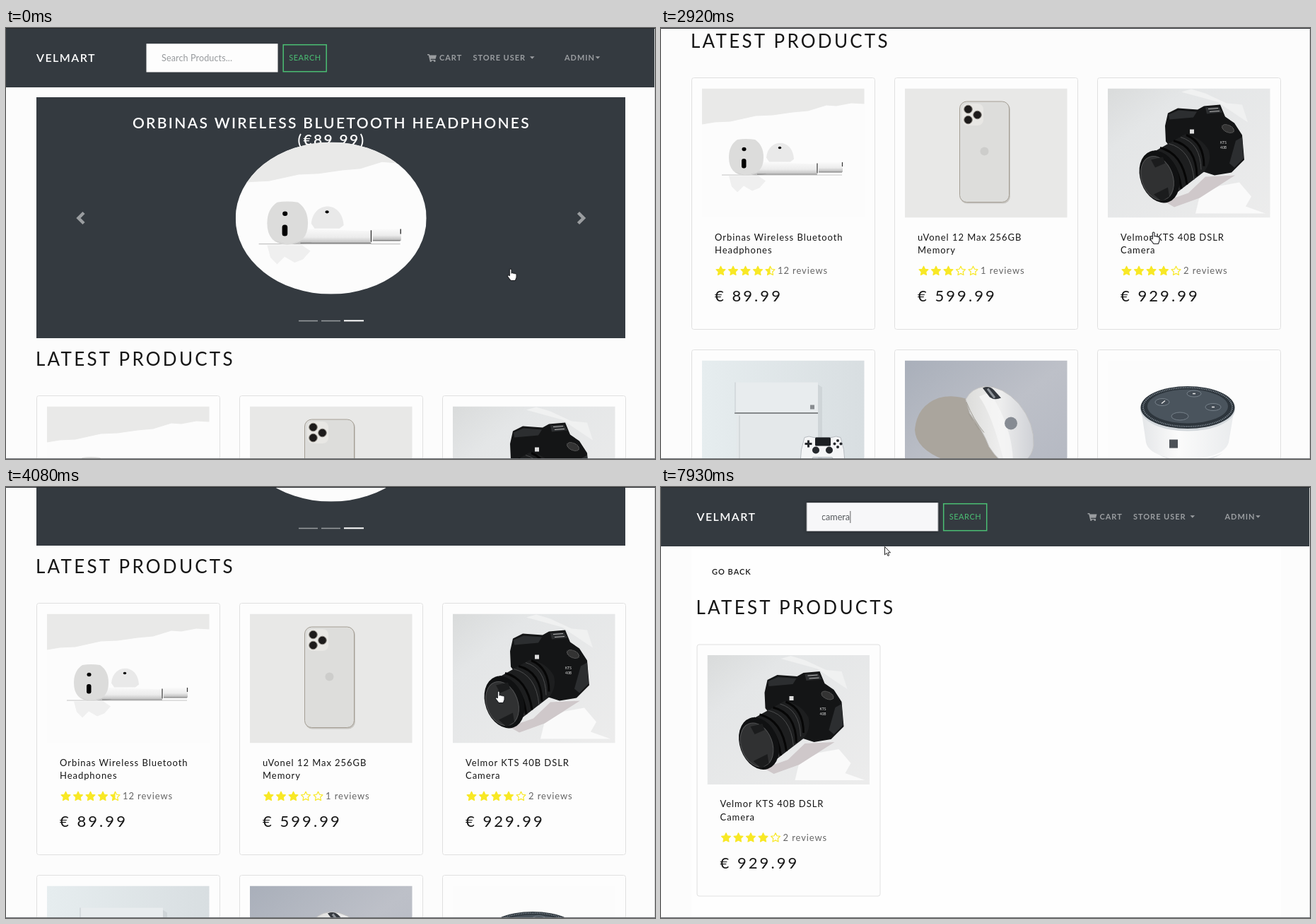
An HTML page that plays this animation: 918x610 px, repeating every 8 s.

```html
<!DOCTYPE html>
<html lang="en">
<head>
<meta charset="utf-8">
<title>Shop search</title>
<style>
html, body { margin: 0; width: 100%; height: 100%; overflow: hidden; background: #fcfcfc; }
#stage { position: relative; width: 918px; height: 610px; overflow: hidden; font-family: Lato, "Open Sans", sans-serif; }
#stage > svg { position: absolute; left: 0; top: 0; display: block; }
text { fill: #161616; white-space: pre; }

/* Everything runs on one 8 s clock with held values */
#scroll, #bar, #home, #results, #field, #hint, #typed, #hand, #beam, #arrow, #wait, #found {
  animation: 8s step-end infinite;
}
#scroll { animation-name: scroll; }
#bar { animation-name: shift; }
#home { animation-name: leave; }
#results { animation-name: enter; opacity: 0; }
#field { animation-name: focus; fill: #fdfdfd; }
#hint { animation-name: hint; fill: #979a9d; }
#hand { animation-name: hand; transform: translate(708px, 340px); }
#beam { animation-name: beam; opacity: 0; }
#arrow { animation-name: enter; opacity: 0; }
#wait { animation-name: wait; }
#found { animation-name: found; opacity: 0; }
#ring { transform-origin: 467px 260.5px; animation: spin .75s steps(6) infinite; }
#typed {
  animation-name: type; position: absolute; left: 219.5px; top: 33.5px; width: 0; height: 17px;
  overflow: hidden; white-space: pre; font-size: 12.6px; line-height: 17px; color: #55595c;
  border-right: 1px solid transparent;
}

@keyframes scroll {
  21.875% { transform: translateY(-23px); }
  23.375% { transform: translateY(-118px); }
  25.125% { transform: translateY(-150px); }
  30.125% { transform: translateY(-252px); }
  31.625% { transform: translateY(-300px); }
  34.75% { transform: translateY(-352px); }
  36.5% { transform: translateY(-450px); }
  38% { transform: translateY(-525px); }
  41.125% { transform: translateY(-625px); }
  42.875% { transform: translateY(-675px); }
  47.625% { transform: translateY(-640px); }
  49.125% { transform: translateY(-525px); }
  51% { transform: translateY(-356px); }
  52.75% { transform: translateY(-200px); }
  54.25% { transform: translateY(-60px); }
  55.75% { transform: none; }
}
@keyframes hand {
  5.75% { transform: translate(707px, 330px); }
  7.25% { transform: translate(703px, 312px); }
  8.75% { transform: translate(700px, 299px); }
  10.625% { transform: translate(693px, 290px); }
  12.5% { transform: translate(691px, 288px); }
  58.875% { transform: translate(430px, 108px); opacity: 1; }
  60.625% { transform: translate(430px, 108px); opacity: 0; }
  100% { opacity: 0; }
}
@keyframes beam {
  60.625% { opacity: 1; transform: translate(4px, 3px); }
  62.125% { opacity: 1; transform: none; }
  71.625% { opacity: 0; }
}
@keyframes type {
  64% { width: 0; border-color: #333; }
  70.125% { width: 6px; border-color: #333; }
  73.5% { width: 12px; border-color: #333; }
  75% { width: 22.5px; border-color: #333; }
  76.5% { width: 29px; border-color: #333; }
  78% { width: 34px; border-color: #333; }
  81.125% { width: 40.5px; border-color: #333; transform: none; }
  88% { width: 40.5px; border-color: transparent; transform: translateX(7.5px); }
  94.375% { width: 40.5px; border-color: #333; transform: translateX(7.5px); }
  100% { width: 40.5px; border-color: #333; transform: translateX(7.5px); }
}
@keyframes shift { 88%, 100% { transform: translateX(7.5px); } }
@keyframes leave { 88%, 100% { opacity: 0; } }
@keyframes enter { 88%, 100% { opacity: 1; } }
@keyframes focus { 64%, 100% { fill: #f7f7f9; filter: drop-shadow(0 0 2px rgba(0, 0, 0, .5)); } }
@keyframes hint { 70.125%, 100% { opacity: 0; } }
@keyframes wait { 97.625%, 100% { opacity: 0; } }
@keyframes found { 97.625%, 100% { opacity: 1; } }
@keyframes spin { to { transform: rotate(360deg); } }

.brand { font-size: 16px; font-weight: 600; letter-spacing: 1.45px; fill: #fff; }
.nav { font-size: 11px; font-weight: 700; letter-spacing: .95px; fill: #9a9da0; }
.find { font-size: 11px; letter-spacing: .5px; fill: #4bbf73; }
.hero { font-size: 21px; font-weight: 600; letter-spacing: 2.35px; fill: #fff; text-anchor: middle; }
.h1 { font-size: 26px; letter-spacing: 3.25px; }
.back { font-size: 11px; font-weight: 600; letter-spacing: 1px; }
.name { font-size: 13px; letter-spacing: .95px; }
.count { font-size: 13px; letter-spacing: .9px; fill: #666; }
.price { font-size: 22px; letter-spacing: 3.05px; }
.tiny { font-size: 5px; fill: #ddd; }
</style>
</head>
<body>
<div id="stage">
<svg width="918" height="610" viewBox="0 0 918 610">
  <defs>
    <linearGradient id="stem" x2="0" y2="1"><stop stop-color="#fafafa"/><stop offset=".55" stop-color="#ececec"/><stop offset="1" stop-color="#b5b5b5"/></linearGradient>
    <linearGradient id="desk" x2="1" y2="1"><stop stop-color="#d9dbdb"/><stop offset=".25" stop-color="#e4e6e7"/><stop offset="1" stop-color="#ececec"/></linearGradient>
    <linearGradient id="wall" x2="1" y2="0"><stop stop-color="#e6edef"/><stop offset="1" stop-color="#d8dee1"/></linearGradient>
    <linearGradient id="mat" x2="1" y2="1"><stop stop-color="#a9afba"/><stop offset=".5" stop-color="#bdc0c8"/><stop offset="1" stop-color="#b3b7c1"/></linearGradient>
    <linearGradient id="shell" x2="1" y2="0"><stop stop-color="#dcdcda"/><stop offset=".5" stop-color="#eeeeee"/><stop offset="1" stop-color="#cfd1d6"/></linearGradient>
    <linearGradient id="cup" x2="1" y2="0"><stop stop-color="#e4e6e8"/><stop offset=".4" stop-color="#fbfbfb"/><stop offset="1" stop-color="#e9ebed"/></linearGradient>
    <clipPath id="oval"><ellipse cx="459.7" cy="269.200" rx="135" ry="107.600"/></clipPath>

    <symbol id="buds" viewBox="0 0 229.5 183">
      <path fill="#fcfcfc" d="M0 0h230v183H0z"/>
      <path fill="#e9e9e8" d="M0 0H230V22L211 21 190 25 176 24 150 32 128 34 100 38 76 39 40 47 18 48 0 51z"/>
      <path fill="#efefef" d="M38 124h42l10 7-9 10-10 4-12-7-9 9-8-8z"/>
      <path stroke="#c4c4c4" d="M28 122.500h170"/>
      <path fill="#e9e9e9" d="M91 98c2-27 37-29 39 2l-5 4h-30z"/>
      <ellipse cx="110" cy="84" rx="2.200" ry="1.800"/>
      <path fill="url(#stem)" d="M76 104l86 3v14H92q-14 3-24 1z"/>
      <path fill="url(#stem)" d="M165 104.500h34v14h-34z"/>
      <path stroke="#333" stroke-width="1.200" d="M163 106v14M198.500 104.500v6"/>
      <path stroke="#777" d="M78 121.500h85M165 118.500h33"/>
      <path fill="#dcdcdb" d="M50 72.500q12-2 25 0 12 8 12 25 0 25-25 26-24-1-24-26 0-17 12-25z"/>
      <path fill="#c6c6c6" d="M46 118q14 8 30 1-12 7-30-1z"/>
      <ellipse cx="59.500" cy="86" rx="3" ry="2.800"/>
      <rect x="56" y="99.500" width="6.500" height="13.500" rx="3"/>
    </symbol>

    <symbol id="phone" viewBox="0 0 229.5 183">
      <path fill="#e8e8e7" d="M0 0h230v183H0z"/>
      <rect x="78" y="20" width="71" height="143" rx="10" fill="#c8c6c2"/>
      <rect x="77.500" y="18.500" width="70" height="142.500" rx="10" fill="#dddddb" stroke="#a49e94"/>
      <rect x="81" y="21.500" width="30" height="31" rx="8" fill="#e8e7e4"/>
      <g fill="#1d1b1b" stroke="#8b8780"><circle cx="89.500" cy="29.500" r="5.800"/><circle cx="102.500" cy="37.500" r="5.800"/><circle cx="89.500" cy="44.500" r="5.800"/></g>
      <circle cx="112.500" cy="89" r="6" fill="#cdcdcb"/>
    </symbol>

    <symbol id="camera" viewBox="0 0 229.5 183">
      <path fill="url(#desk)" d="M0 0h230v183H0z"/>
      <path fill="#f0f1f1" d="M104 5l14-4 20 6 30 14 22 2 8 25-18-12-25-17z"/>
      <path fill="#fafafa" d="M130 152l28-14 28-5 17 20-8 14 28 10H124z"/>
      <path fill="#cfc8ca" d="M80 160l34-12 24-23 42-2-50 32-36 13z"/>
      <path fill="#141516" d="M81 53l4-18 14-7 28 2 9-5 23-2 7 17 13 9 11 17 3 35-18 18-24 4-25-8-30-22-14-18z"/>
      <path fill="#2c2e30" d="M86 37l14-6 26 2-5 8-34 3zM138 27l19-1 5 8-22 2zM181 74l9-5 2 30-13 13-7-6z"/>
      <path stroke="#b8b8b8" d="M142 29l14-1M144 33l14-1"/>
      <ellipse cx="170" cy="57" rx="9" ry="5" fill="#333" stroke="#777" stroke-dasharray="1 1" transform="rotate(25 170 57)"/>
      <path fill="#1d1e1f" d="M54 96l55-31q24 4 34 23 4 17-7 30l-52 40z"/>
      <g fill="none" stroke="#060606" stroke-width="3"><path d="M66 89q32 8 38 53M74 84q32 8 38 52M93 74q32 8 33 50M111 66q25 10 25 44"/></g>
      <g fill="none" stroke="#4b4c4d"><path d="M63 91q32 8 38 53M86 78q32 8 36 51M103 69q28 8 29 46"/></g>
      <ellipse cx="73" cy="125" rx="27" ry="38" fill="#101112" transform="rotate(-20 73 125)"/>
      <ellipse cx="70" cy="127" rx="22" ry="32" fill="#303132" stroke="#505152" transform="rotate(-20 70 127)"/>
      <path fill="#1b1c1d" d="M61 101l17-4 3 9-14 6zM65 150l20-10 2 13-11 7z"/>
      <path fill="#ddd" d="M116 58h6v6h-6z"/>
      <text class="tiny" x="159" y="78">KTS</text><text class="tiny" x="159" y="85">40B</text>
    </symbol>

    <symbol id="console" viewBox="0 0 229.5 183">
      <path fill="url(#wall)" d="M0 0h230v183H0z"/>
      <path fill="#eef2f5" d="M0 148h230v35H0z"/>
      <path fill="#cfd5d8" d="M164 34l6 4v110h-6zM40 148h128v3H40z"/>
      <path fill="#e8ecee" d="M47 31h117v43H47z"/>
      <path fill="#e4e8ea" d="M49 75h115v74H49z"/>
      <path stroke="#66696b" stroke-width="1.300" d="M46 74.500h118"/>
      <path stroke="#c5cbce" d="M53 78v70M47 31v43"/>
      <path fill="#888c90" d="M153 63h6v6h-6z"/>
      <path fill="#f4f5f6" stroke="#b6bbc0" d="M145 109q6-3 13 0h25q7-3 13 0 6 17 6 34-1 11-9 9l-9-15h-27l-8 15q-9 2-10-8 0-18 6-35z"/>
      <rect x="160" y="109" width="22" height="12" rx="1.500" fill="#1c1f23"/>
      <g fill="#26292d"><circle cx="161" cy="127" r="5"/><circle cx="180" cy="127" r="5"/><path d="M149 113h3v10h-3zM145.500 116.500h10v3h-10z"/><circle cx="192" cy="113.500" r="2"/><circle cx="192" cy="122.500" r="2"/><circle cx="187.500" cy="118" r="2"/><circle cx="196.500" cy="118" r="2"/></g>
    </symbol>

    <symbol id="mouse" viewBox="0 0 229.5 183">
      <path fill="url(#mat)" d="M0 0h230v183H0z"/>
      <path fill="#aaa59d" d="M14 98q3-34 34-45 22-6 46 4l40 88q-40 10-78-4-41-16-42-43z"/>
      <path fill="url(#shell)" stroke="#c3c3c3" d="M86 55q8-16 27-18 25-1 48 24 23 28 21 60-4 26-33 26-15-1-30-25-8-22-27-47z"/>
      <path fill="#f7f7f7" opacity=".75" d="M105 51q18 25 34 88l14 5q-1-51-33-99z"/>
      <path fill="#34383e" d="M110 39q9-4 16 3l10 11q-9 4-16-1z"/>
      <path stroke="#8e9399" stroke-width="3" d="M117 40l10 13"/>
      <path fill="none" stroke="#a09c93" d="M87 59q10 25 25 43M90 75l6 10M99 89l6 9"/>
      <circle cx="150" cy="89" r="9" fill="#868b93"/>
    </symbol>

    <symbol id="speaker" viewBox="0 0 229.5 183">
      <path fill="#fcfcfc" d="M0 0h230v183H0z"/>
      <path fill="#e6e8ea" d="M65 129q45 25 98 2l-20 11q-42 5-64-5z"/>
      <path fill="url(#cup)" d="M47 68l7 48q3 14 27 20 34 7 62 0 24-6 28-20l8-48z"/>
      <ellipse cx="113" cy="69" rx="67" ry="31" fill="#d3d8dc"/>
      <ellipse cx="113" cy="66.500" rx="66.500" ry="30" fill="#2d353c"/>
      <ellipse cx="113" cy="66" rx="63" ry="27.500" fill="none" stroke="#87919a" stroke-width="2" stroke-dasharray="1 1.500"/>
      <ellipse cx="113" cy="65" rx="57" ry="24" fill="#4a545d"/>
      <g fill="#434c55" stroke="#77828b"><ellipse cx="122" cy="47" rx="10" ry="4.500"/><ellipse cx="77" cy="59" rx="10" ry="5"/><ellipse cx="149" cy="66" rx="11" ry="5"/><ellipse cx="102" cy="79" rx="12" ry="5.500"/></g>
      <path stroke="#e8e8e8" stroke-width="1.500" d="M76 61l5-4M147 66h4M120 47h4"/>
      <path fill="#4c5157" d="M87 112h12v12H87z"/>
    </symbol>
  </defs>

  <g id="scroll">
    <g id="home">
      <path fill="#343a40" d="M43 98h833v341H43z"/>
      <text class="hero" x="460.500" y="142">ORBINAS WIRELESS BLUETOOTH HEADPHONES</text>
      <text class="hero" x="460.500" y="166">(€89.99)</text>
      <g clip-path="url(#oval)"><use href="#buds" x="324.700" y="161.500" width="270" height="215.300"/></g>
      <path fill="none" stroke="#9a9da0" stroke-width="4.500" d="M110 261.500l-7.500 7.500 7.500 7.500M809.500 261.500l7.500 7.500-7.500 7.500"/>
      <path stroke="#999c9f" stroke-width="1.500" d="M414 414.500h27M446 414.500h27"/>
      <path stroke="#fff" stroke-width="2" d="M478 414.300h28"/>
      <text class="h1" x="42" y="477.500">LATEST PRODUCTS</text>
      <g id="grid"></g>
    </g>
    <path fill="#343a40" d="M0 0h918v84H0z"/>
    <g id="bar">
      <text class="brand" x="43" y="47.500">VELMART</text>
      <rect id="field" x="198.500" y="22.200" width="186" height="40.300"/>
      <text id="hint" x="220" y="46.500" font-size="12.600" letter-spacing=".1">Search Products...</text>
      <rect x="392.200" y="23.700" width="61" height="38" fill="none" stroke="#4bbf73" stroke-width="1.500"/>
      <text class="find" x="400.300" y="46">SEARCH</text>
      <g fill="#9a9da0">
        <path d="M596 37h2.800l.4 1.500H609l-1.400 5.300h-7l.3 1.200h6.200v1.200H599.500L597.700 38.400H596z"/>
        <circle cx="600.800" cy="46.800" r="1.300"/><circle cx="606.300" cy="46.800" r="1.300"/>
        <path d="M741 40.300h6.600l-3.300 3.500zM833.700 40.300h6.600l-3.300 3.500z"/>
      </g>
      <text class="nav" x="613" y="46">CART</text>
      <text class="nav" x="660.500" y="46">STORE USER</text>
      <text class="nav" x="790" y="46">ADMIN</text>
    </g>
  </g>

  <g id="results">
    <path fill="#fefefe" d="M43 84h834v526H43z"/>
    <text class="back" x="72" y="123.500">GO BACK</text>
    <text class="h1" x="49.500" y="179.500">LATEST PRODUCTS</text>
    <g id="wait"><circle id="ring" cx="467" cy="260.500" r="36" fill="none" stroke="#1a1a1a" stroke-width="3" pathLength="100" stroke-dasharray="75 25"/></g>
    <g id="found"></g>
  </g>
</svg>
<div id="typed">camera</div>
<svg width="918" height="610" viewBox="0 0 918 610">
  <path fill="#24272b" d="M0 0h918v1H0z"/>
  <path fill="#6b6e71" d="M0 609h918v1H0z"/>
  <path fill="#d4d5d6" d="M917 1h1v608h-1z"/>
  <g id="hand"><path transform="scale(1.120 1.040)" fill="#fff" stroke="#1b1d20" d="M3.800 10V1.800q1.200-1.800 2.400 0V6.500q1.300-1 2.200.4 1.400-.8 2.100.5 1.500-.6 2 .8v4.300l-1.500 4.200H5.200L1 10.800q.4-2 2.800-.8z"/></g>
  <path id="beam" fill="none" stroke="#222" d="M305.500 36.500h2l.8.500.8-.5h2M308.300 37v9.500M305.500 47h2l.8-.5.8.5h2"/>
  <path id="arrow" fill="#fff" stroke="#222" d="M316.500 84.500v11.500l2.700-2.500 1.800 4 1.700-.8-1.700-3.800h3.500z"/>
</svg>
</div>
<script>
const points = (from, to, r) => Array.from({ length: to - from + 1 }, (_, k) => {
  const i = from + k, a = i * Math.PI / 5, d = i % 2 ? r * 0.5 : r;
  return (d * Math.sin(a)).toFixed(2) + ',' + (-d * Math.cos(a)).toFixed(2);
}).join(' ');

function star(x, fill) {
  const solid = fill > 0 ? `<polygon points="${fill < 1 ? points(5, 10, 7) : points(0, 9, 7)}" fill="#f8e825"/>` : '';
  return `<g transform="translate(${x} 273.500)" stroke-linejoin="round">
    <polygon points="${points(0, 9, 6.8)}" fill="none" stroke="#f8e825" stroke-width="1.200"/>${solid}</g>`;
}

function card(x, y, [art, first, second, rating, reviews, price]) {
  const stars = [0, 1, 2, 3, 4].map(i => star(41 + i * 17.5, rating - i)).join('');
  return `<g transform="translate(${x} ${y})">
    <rect width="259" height="356" rx="3" fill="#fdfdfd" stroke="#e0e0e0"/>
    <use href="#${art}" x="14.500" y="15" width="229.500" height="183"/>
    <text class="name" x="32.500" y="230">${first}</text>
    <text class="name" x="32.500" y="248.500">${second}</text>
    ${stars}
    <text class="count" x="121.500" y="277.500">${reviews} reviews</text>
    <text class="price" x="32.500" y="316.500">€ ${price}</text></g>`;
}

const goods = [
  ['buds', 'Orbinas Wireless Bluetooth', 'Headphones', 4.5, 12, '89.99'],
  ['phone', 'uVonel 12 Max 256GB', 'Memory', 3, 1, '599.99'],
  ['camera', 'Velmor KTS 40B DSLR', 'Camera', 4, 2, '929.99'],
  ['console', 'Tavo Orbitarcade 7 Max White', 'Version', 5, 12, '399.99'],
  ['mouse', 'Norvalin R-Series Gaming', 'Mouse', 3.5, 10, '49.99'],
  ['speaker', 'Zemora Mimi Orb 3rd', 'Generation', 4, 12, '29.99']
];
document.getElementById('grid').innerHTML =
  goods.map((g, i) => card(43.5 + i % 3 * 287, 520.5 + Math.floor(i / 3) * 385, g)).join('');
document.getElementById('found').innerHTML = card(51, 223, goods[2]);
</script>
</body>
</html>
```
